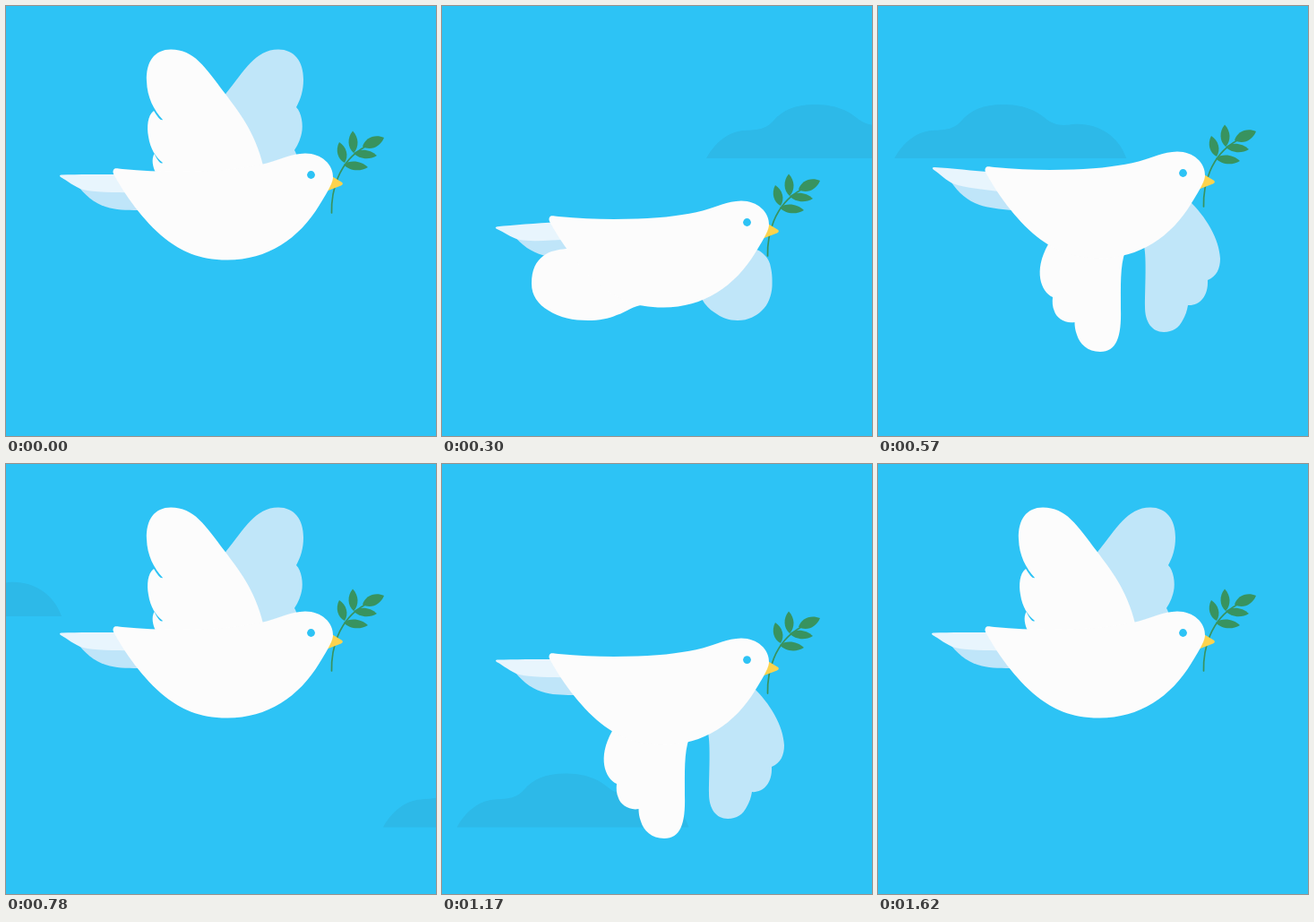
Animation, 480 px wide and 480 px high, one loop 1650 ms. Source, as an HTML page:

```html
<!DOCTYPE html>
<html lang="en">
<head>
<meta charset="utf-8">
<title>Dove</title>
<style>
  html, body { margin: 0; width: 100%; height: 100%; overflow: hidden; background: #2dc3f5; }
  svg { display: block; width: 100vw; height: 100vh; }
</style>
</head>
<body>
<svg viewBox="0 0 480 480">
  <defs>
    <path id="cloud" fill="#2db9e8" d="M0 60C10 42 25 30 42 29C58 28 66 28 75 18C85 6 100 0 120 0C144 0 157 6 168 15C178 23 186 24 200 22C226 20 250 34 259 60Z"/>
  </defs>
  <use id="high" href="#cloud"/>
  <use id="low" href="#cloud"/>
  <g id="bird">
    <path id="far" fill="#c0e6f9"/>
    <g id="tail">
      <path fill="#bfe5f9" d="M82 203C92 215 102 222 116 225.500C126 228 140 228 152 228L140 200Z"/>
      <path fill="#e8f5fd" d="M62 188.500C80 188 105 188 130 188L143 208.500C120 208 98 208 86 205C76 202 69 195 61 191Q58.500 189 62 188.500Z"/>
    </g>
    <g id="branch" fill="#38935f">
      <path fill="none" stroke="#38935f" stroke-width="1.700" stroke-linecap="round" d="M363.500 231C363 208 370 174 401 157"/>
    </g>
    <path fill="#fcd34d" d="M362 189L374.500 196.500Q377.500 198.500 374 200.500L357 207Z"/>
    <path id="near" fill="#fcfcfc"/>
    <path fill="#fcfcfc" d="M120 183C121 180.500 123 181 130 182C160 185 190 185.500 218 184.500C250 183.500 272 180 291 175.500C307 171 318 165 334 164.500C352 164.500 366 177 365 192C364 200 356 212 350 222C327 260 292 283.500 247 283.500C215 283.500 195 273 178 260C152 239 132 209 122 191C119.500 187 119 185 120 183Z"/>
    <circle cx="340.500" cy="188.500" r="4.400" fill="#2dc3f5"/>
  </g>
</svg>
<script>
const STEP = 30, LOOP = 1650;
const $ = id => document.getElementById(id);

// Wing outlines: raised, folded, lowered. Each set shares one command order.
const nearWing = [
  'M287 178C278 140 259 117 244 97C222 68 210 48.5 184 48.5C166 48.5 156 62 157 84C157.5 102 165 116 175 127Q172 129 165 117C158 122 157 135 159 146C161 159 167 169 175 175Q172 178 165.5 165C162 171 164 180 167 186L230 230Z',
  'M225 281C213 281 208 288 195 292C186 296 175 298 163 298C147 298 131 295 119 287C107 280 100 270 100 257Q100 257 100 257C100 241 105 232 113 226C121 220 130 219 138 218Q138 218 138 218C150 218 160 215 170 212L230 230Z',
  'M276 276C270 292 271 315 271 340C272 372 266 388 248 388C234 388 225 379 222 369C220 364 219.5 359 219.5 355Q219.5 355 219.5 355C209 357 199 350 197 343C194.5 338 194.5 332 195 327Q195 327 195 327C182 321 173 298 190 268L230 230Z'
];
const farWing = [
  'M260 175C235 140 235 110 246 97C266 73 278 48.5 304 48.5C322 48.5 332 62 332 82C332 94 329 104 324 113C330 119 332 133 330 142C328 151 325 156 322 161C324 164 325 168 325 175L290 190Z',
  'M290 274C294 281 299 286 304 289C312 295 320 298 330 298C342 298 351 293 357 287C364 281 368 270 368.5 260C369 250 368 243 367 239C366 233 364 229 361 226C358 223 355 220 351 219L310 240Z',
  'M297 270C300 285 298 315 298 338C298 355 306 366 319 366C329 366 336 361 340 353C343 348 345 342 346 336C358 337 369 327 368 308C378 304 382 295 382 284C381 262 366 237 347 219L310 240Z'
];

// Keys: [step, value]
const lift = [[0, 0], [10, 53], [19, -2], [26, 0], [35, 53], [44, -2], [53, 0]];
const tilt = [[0, 0], [10, -4], [19, 5.5], [26, 0], [35, -4], [44, 5.5], [53, 0]];
const sway = [[0, 0], [10, -5], [19, -5], [26, 0], [35, -5], [44, -5], [53, 0]];
const flap = [[0, 0], [10, 1], [12, 2], [19, 2], [26, 3], [35, 4], [37, 5], [44, 5], [53, 6]];

const ease = u => u * u * (3 - 2 * u);
const mix = (a, b, u) => a + (b - a) * u;

function at(keys, n) {
  const i = keys.findIndex(k => k[0] > n);
  if (i < 0) return keys[keys.length - 1][1];
  const [a, b] = [keys[i - 1], keys[i]];
  return mix(a[1], b[1], ease((n - a[0]) / (b[0] - a[0])));
}

const number = /[\d.]+/g;
function morph(poses, p) {
  const i = Math.floor(p), u = p - i;
  const next = poses[(i + 1) % 3].match(number);
  let k = 0;
  return poses[i % 3].replace(number, v => mix(+v, +next[k++], u).toFixed(2));
}

// A leaf from stalk to tip, w is its half width
function leaf(x1, y1, x2, y2, w) {
  const dx = x2 - x1, dy = y2 - y1, len = Math.hypot(dx, dy);
  const nx = -dy / len * w * 1.33, ny = dx / len * w * 1.33;
  const side = s => [x1 + dx * .25 + nx * s, y1 + dy * .25 + ny * s, x1 + dx * .7 + nx * s, y1 + dy * .7 + ny * s];
  const [a, b, c, d] = side(1), [e, f, g, h] = side(-1);
  const path = document.createElementNS('http://www.w3.org/2000/svg', 'path');
  path.setAttribute('d', `M${x1} ${y1}C${a} ${b} ${c} ${d} ${x2} ${y2}C${g} ${h} ${e} ${f} ${x1} ${y1}Z`);
  $('branch').append(path);
}
leaf(398, 157, 422, 147, 6);
leaf(388, 164, 387, 139.5, 5);
leaf(378, 175, 372, 152, 5);
leaf(388, 164, 414, 167, 4.7);
leaf(377, 177, 404, 180, 4.8);

const move = (id, x, y) => $(id).setAttribute('transform', `translate(${x} ${y})`);

function draw(ms) {
  const n = Math.floor((ms % LOOP) / STEP);
  move('high', 295 - 30.75 * (n - 10), 110);
  move('low', 141 - 31.1 * (n - 35), 345.5);
  move('bird', 0, at(lift, n));
  move('branch', 0, at(sway, n));
  $('tail').setAttribute('transform', `rotate(${at(tilt, n)} 130 195)`);
  const p = at(flap, n);
  $('near').setAttribute('d', morph(nearWing, p));
  $('far').setAttribute('d', morph(farWing, p));
}

const start = performance.now();
function tick() {
  draw(performance.now() - start);
  requestAnimationFrame(tick);
}
tick();
</script>
</body>
</html>
```
